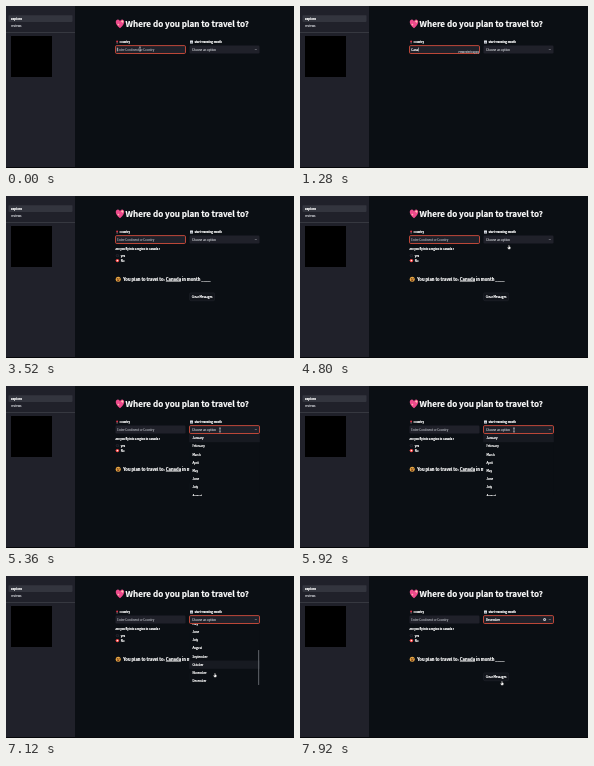
Recreate the animation shown at these times as an HTML page with a canvas. Size 288x162 px, loop 8 s.

```html
<!DOCTYPE html>
<html lang="en">
<head>
<meta charset="utf-8">
<title>Travel planner</title>
<style>
html, body { margin: 0; width: 100%; height: 100%; overflow: hidden; background: #0b0f14; }
canvas { display: block; width: 100vw; height: 100vh; }
</style>
</head>
<body>
<canvas id="stage"></canvas>
<script>
const W = 288, H = 162, LOOP = 8000;
const FONT = '"Noto Sans CJK SC", "Noto Sans CJK JP", "Noto Sans CJK", "Noto Sans", sans-serif';
const BG = '#0b0f14', PANEL = '#20212a', WHITE = '#ffffff', GREY = '#8f9299', RED = '#e8543f';
const BODY = 2.94, LABEL = 2.57;
const MONTHS = ['January', 'February', 'March', 'April', 'May', 'June', 'July',
  'August', 'September', 'October', 'November', 'December'];
const ROW = 8.2, LIST_TOP = 48, LIST_HEIGHT = 62, MAX_SCROLL = 37.2;

// Moments of the interaction, in ms
const TYPE_START = 960, KEY_GAP = 105, SUBMIT = 2800, MOUSE_BACK = 3840,
  OPEN = 5280, SCROLL_START = 6480, SCROLL_END = 7040, PICK = 7440;
const PATH = [[0, 134, 43], [MOUSE_BACK, 134, 43], [4640, 209, 51], [4960, 209, 51],
  [OPEN, 214, 44], [5920, 214, 44], [6400, 212, 83], [7040, 209, 89],
  [7120, 209, 99], [7360, 209, 104], [PICK, 209, 105], [7840, 202, 107], [LOOP, 202, 107]];

const canvas = document.getElementById('stage');
const ctx = canvas.getContext('2d');

const clamp = v => Math.max(0, Math.min(1, v));
const ease = v => v * v * (3 - 2 * v);

function mouseAt(t) {
  const i = Math.max(1, PATH.findIndex(p => p[0] > t));
  const [t0, x0, y0] = PATH[i - 1], [t1, x1, y1] = PATH[i];
  const k = ease(clamp((t - t0) / (t1 - t0)));
  return { x: x0 + (x1 - x0) * k, y: y0 + (y1 - y0) * k };
}

function box(x, y, w, h, fill, stroke, radius = 1.2, line = 0.8) {
  ctx.beginPath();
  ctx.roundRect(x, y, w, h, radius);
  if (fill) { ctx.fillStyle = fill; ctx.fill(); }
  if (stroke) { ctx.strokeStyle = stroke; ctx.lineWidth = line; ctx.stroke(); }
}

function disc(x, y, r, fill) {
  ctx.beginPath();
  ctx.arc(x, y, r, 0, Math.PI * 2);
  ctx.fillStyle = fill;
  ctx.fill();
}

// Draws slightly thickened text on its baseline and returns the x where it ends.
function text(str, x, y, size, color = WHITE, weight = 400, align = 'left') {
  ctx.font = `${weight} ${size}px ${FONT}`;
  ctx.textAlign = align;
  ctx.fillStyle = ctx.strokeStyle = color;
  ctx.lineWidth = 0.2;
  ctx.lineJoin = 'round';
  ctx.fillText(str, x, y);
  ctx.strokeText(str, x, y);
  return x + ctx.measureText(str).width;
}

function shape(path, x, y, scale, fill, stroke, line = 0.5) {
  ctx.save();
  ctx.translate(x, y);
  ctx.scale(scale, scale);
  const p = new Path2D(path);
  if (fill) { ctx.fillStyle = fill; ctx.fill(p); }
  if (stroke) { ctx.strokeStyle = stroke; ctx.lineWidth = line; ctx.stroke(p); }
  ctx.restore();
}

function sidebar() {
  ctx.fillStyle = PANEL;
  ctx.fillRect(0, 0, 69, H);
  box(2.5, 9.3, 64, 6.6, '#33353e', null, 0.8);
  text('explore', 5, 13.7, BODY, WHITE, 700);
  text('reviews', 5, 21, BODY, '#b0b2b8');
  ctx.fillStyle = '#3c3e47';
  ctx.fillRect(0, 26, 69, 0.8);
  ctx.fillStyle = '#000';
  ctx.fillRect(5, 30, 41, 41);
}

function heading() {
  shape('M0 4C-6-1-4-4.4-1.9-4.3Q-.5-4.2 0-2.8Q.5-4.2 1.9-4.3C4-4.4 6-1 0 4Z', 114, 18.1, 1.06, '#ee4a8c');
  const sparkle = 'M0-1.2Q.2-.2 1.2 0Q.2.2 0 1.2Q-.2.2-1.2 0Q-.2-.2 0-1.2Z';
  shape(sparkle, 116.3, 15.6, 1.3, '#ffc7b0');
  shape(sparkle, 112.3, 18.6, 1, '#ffc7b0');
  text('Where do you plan to travel to?', 119.6, 21, 8.12, WHITE, 700);
}

function countryField(t) {
  const focused = t < OPEN;
  const typed = t < SUBMIT ? 'Canada'.slice(0, Math.max(0, Math.floor((t - TYPE_START) / KEY_GAP) + 1)) : '';
  disc(111.1, 35.5, 0.9, '#e8364a');
  shape('M0 0V2', 111.1, 36, 1, null, '#b9bcc4', 0.4);
  text('Country', 113.6, 37.3, LABEL, WHITE, 700);
  box(109.5, 39.6, 70, 7.9, PANEL, focused ? RED : null);
  const end = text(typed || 'Enter Continent or Country', 111.3, 44.6, BODY, typed ? WHITE : GREY);
  if (typed) text('Press Enter to apply', 178.8, 46.9, 2.2, '#a5a7ad', 400, 'right');
  if (focused && t % 1000 < 500) {
    ctx.fillStyle = WHITE;
    ctx.fillRect(typed ? end + 0.2 : 110.9, 41.6, 0.5, 3.8);
  }
}

function monthField(t) {
  const picked = t >= PICK;
  box(184, 34.5, 3, 3, '#e9edf2', null, 0.3);
  ctx.fillStyle = '#8a9099';
  ctx.fillRect(184.5, 35.7, 2, 1.2);
  text('Start Traveling Month', 188.5, 37.3, LABEL, WHITE, 700);
  box(183.5, 39.6, 70, 7.9, PANEL, t >= OPEN ? RED : null);
  text(picked ? 'December' : 'Choose an option', 186, 44.6, BODY, picked ? WHITE : '#a9abb1');
  if (picked) {
    disc(244.6, 43.5, 1.5, '#c9cad0');
    shape('M-.6-.6L.6.6M.6-.6L-.6.6', 244.6, 43.5, 1, null, PANEL, 0.4);
  }
  shape('M-.9-.4L0 .5L.9-.4', 249.8, 43.5, 1, null, '#c9cad0', 0.45);
}

function answer() {
  text('Are you fly into a region in Canada ?', 109.4, 54.4, LABEL, WHITE, 700);
  disc(111.4, 59.6, 1.6, '#2a2c35');
  disc(111.4, 59.6, 1.1, '#11141a');
  text('yes', 114.7, 60.7, BODY);
  disc(111.4, 64.6, 1.7, '#ff4b4b');
  disc(111.4, 64.6, 0.7, WHITE);
  text('No', 114.7, 65.7, BODY);

  disc(112.2, 83.2, 2.5, '#e8a844');
  disc(111.3, 82.5, 0.5, '#5a3215');
  disc(113.1, 82.5, 0.5, '#5a3215');
  shape('M-1.4 0H1.4Q1.1 1.5 0 1.5T-1.4 0Z', 112.2, 83.6, 1, '#7a3b1c');
  const size = 4.12, y = 84.9;
  const start = text('You plan to travel to: ', 117.2, y, size, WHITE, 700);
  const end = text('Canada', start, y, size, WHITE, 700);
  ctx.fillStyle = WHITE;
  ctx.fillRect(start, y + 0.6, end - start, 0.5);
  text(' in month ____', end, y, size, WHITE, 700);

  box(183.6, 96.9, 25, 7.8, '#11141a', '#2c2f37', 1.2, 0.4);
  text('Clear Messages', 196.1, 101.9, BODY, WHITE, 400, 'center');
}

function dropdown(t) {
  const scroll = MAX_SCROLL * ease(clamp((t - SCROLL_START) / (SCROLL_END - SCROLL_START)));
  const hover = mouseAt(t - 120).y - LIST_TOP + scroll;
  const active = Math.max(0, Math.min(11, Math.floor(hover / ROW)));
  ctx.save();
  ctx.beginPath();
  ctx.roundRect(183.2, LIST_TOP, 70.6, LIST_HEIGHT, 1.2);
  ctx.clip();
  ctx.fillStyle = BG;
  ctx.fillRect(183, LIST_TOP, 71, LIST_HEIGHT);
  MONTHS.forEach((month, i) => {
    const y = LIST_TOP + i * ROW - scroll;
    if (i === active) {
      ctx.fillStyle = '#171a21';
      ctx.fillRect(183, y, 71, ROW);
    }
    text(month, 186.4, y + 5.1, BODY);
  });
  if (scroll > 0) box(252.2, LIST_TOP + scroll * 0.7, 1, 35, '#666970', null, 0.5);
  ctx.restore();
}

function pointer(t) {
  if (t >= TYPE_START && t < MOUSE_BACK) return;
  const { x, y } = mouseAt(t);
  const overField = y < 47.5;
  if (overField) {
    shape('M-.8-2H.8M0-2V2M-.8 2H.8', x, y, 1, null, '#e4e5e8', 0.6);
  } else {
    shape('M-.5-1.8Q0-2.3.4-1.8V-.5L1.6-.1Q1.9 1.2 1.1 2.2H-.7L-1.7.5Q-1.4 0-.5.5Z', x, y, 1, '#fff', '#111', 0.25);
  }
}

function draw(now) {
  const t = now % LOOP;
  const w = Math.round(innerWidth * devicePixelRatio), h = Math.round(innerHeight * devicePixelRatio);
  if (canvas.width !== w || canvas.height !== h) { canvas.width = w; canvas.height = h; }
  ctx.setTransform(w / W, 0, 0, h / H, 0, 0);
  ctx.fillStyle = BG;
  ctx.fillRect(0, 0, W, H);
  sidebar();
  heading();
  countryField(t);
  monthField(t);
  if (t >= SUBMIT) answer();
  if (t >= OPEN && t < PICK) dropdown(t);
  ctx.fillStyle = '#06070a';
  ctx.fillRect(0, 161, W, 1);
  pointer(t);
}

function tick() {
  draw(performance.now());
  requestAnimationFrame(tick);
}
tick();
</script>
</body>
</html>
```
